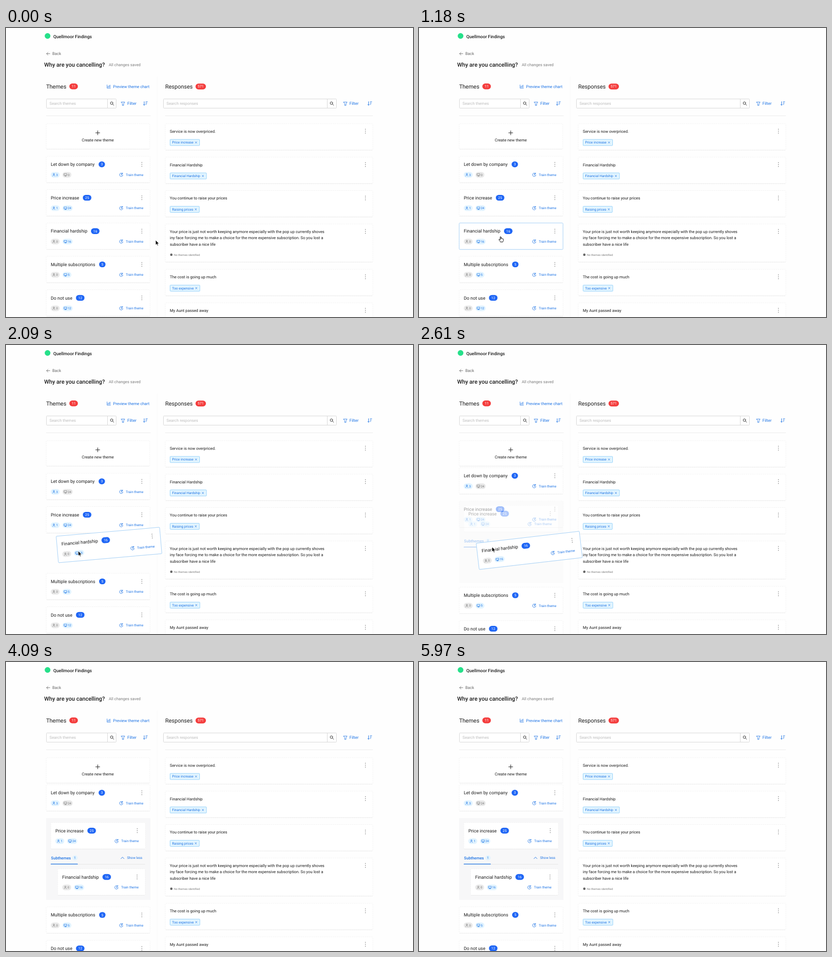
Animation of 800x568 px, one loop 6 s. Source, as an HTML page:

```html
<!DOCTYPE html>
<html lang="en">
<head>
<meta charset="utf-8">
<title>Theme drag and drop</title>
<style>
  html, body { margin: 0; width: 100%; height: 100%; overflow: hidden; background: #fefefe; }
  svg { display: block; width: 100vw; height: 100vh; font-family: Roboto, Arial, sans-serif; }
  text { white-space: pre; text-rendering: geometricPrecision; }
</style>
</head>
<body>
<svg viewBox="0 0 800 568">
  <g id="right"></g>
  <g id="left"><g id="head"></g><g id="list"></g></g>
  <g id="over"></g>
</svg>
<script>
const LOOP = 6000;
const BLUE = '#1b72e4', PILL = '#1f66f5', RED = '#f43d3d', INK = '#1c1c1c', GRAY = '#7d7d7d';
const EDGE = '#f2f2f2', LINE = '#e9e9e9';
const $ = id => document.getElementById(id);

// Drawing helpers
const text = (x, y, s, size = 7.8, fill = INK, weight = 400, anchor = 'start') =>
  `<text x="${x}" y="${y + size * .355}" font-size="${size}" fill="${fill}" font-weight="${weight}" text-anchor="${anchor}">${s}</text>`;
const rect = (x, y, w, h, fill, stroke = 'none', rx = 0, more = '') =>
  `<rect x="${x}" y="${y}" width="${w}" height="${h}" rx="${rx}" fill="${fill}" stroke="${stroke}" ${more}/>`;
const path = (d, stroke, width = .8, fill = 'none') =>
  `<path d="${d}" fill="${fill}" stroke="${stroke}" stroke-width="${width}" stroke-linejoin="round" stroke-linecap="round"/>`;
const group = (x, y, body, opacity = 1, turn = 0) =>
  `<g transform="translate(${x} ${y}) rotate(${turn})" opacity="${opacity}">${body}</g>`;
const pill = (x, y, w, h, s, fill, size, color = '#fff') =>
  rect(x, y - h / 2, w, h, fill, 'none', h / 2) + text(x + w / 2, y, s, size, color, 400, 'middle');
const dots = (x, y) => [-3.7, 0, 3.7].map(d => `<circle cx="${x}" cy="${y + d}" r=".75" fill="#666"/>`).join('');
const dashed = (x, y, w, h) =>
  rect(x, y, w, h, '#fff', EDGE, 1.5, 'stroke-width=".8" stroke-dasharray="3 1.2"') +
  path(`M${x + 1} ${y + h}h${w - 2}`, LINE, .7);

// Icons, centred on x, y
const icon = (x, y, d, color, width) => group(x, y, path(d, color, width));
const funnel = (x, y) => icon(x, y, 'M-3.4-3.2H3.4L1.2.2V3.4H-1.2V.2Z', BLUE);
const sorter = (x, y) => icon(x, y, 'M-2.4-3.6V3.6M-4 2L-2.4 3.6L-.8 2M.8-3.4H4M.8-.8H3M.8 1.8H2.2', BLUE, .9);
const lens = (x, y) => icon(x, y, 'M1.7-.8A2.5 2.5 0 1 1-3.3-.8A2.5 2.5 0 1 1 1.7-.8M1.1 1.1L3.4 3.4', '#222', .9);
const trainer = (x, y) => icon(x, y, 'M2.5-2.4A3.4 3.4 0 1 0 3.4.6M2.7-3.7V-2H1M0-1.6V.4H2', BLUE);
const person = (x, y, c) => icon(x, y, 'M1.3-1.3A1.3 1.3 0 1 1-1.3-1.3A1.3 1.3 0 1 1 1.3-1.3M-2.2 2.6C-2 0 2 0 2.2 2.6', c, .7);
const screen = (x, y, c) => icon(x, y, 'M-2.7-2.2H2.7V1.3H-2.7ZM0 1.3V2.6M-1.3 2.6H1.3', c, .7);

function counter(x, n, active, draw) {
  const color = active ? BLUE : '#777', w = n > 9 ? 20 : 17.5;
  return rect(x, 31, w, 11, active ? '#e1f3ff' : '#e9e9e9', 'none', 5.5) + draw(x + 6, 36.5, color) +
    text(x + 10.4, 36.5, n, 6, color);
}

function card(theme, w = 204, glow = 0) {
  const { name, badge, at, people, bots, idle } = theme;
  return dashed(0, 0, w, 52) +
    rect(0, 0, w, 52, '#fff', '#a9d3f8', 1.5, `opacity="${glow}"`) +
    text(9, 16, name, 8.9) +
    pill(at, 16, badge > 9 ? 16.8 : 12.6, 11.4, badge, PILL, 6.8) +
    dots(w - 16, 16) +
    counter(9, people, people > 0, person) + counter(32, bots, bots > 0 && !idle, screen) +
    trainer(w - 56.5, 36.5) + text(w - 47.5, 36.5, 'Train theme', 6.55, BLUE);
}

function search(x, w, split, label) {
  return rect(x, 139.5, w, 18, '#fff', '#d9d9d9', 1) + path(`M${split} 139.5v18`, '#d9d9d9', 1) +
    text(x + 6, 148.5, label, 7.8, '#bdbdbd') + lens(split + 9, 148.5);
}

function response(y, h, lines, tag, tagWidth) {
  const foot = y + 37 + 12.3 * (lines.length - 1);
  const note = tag
    ? rect(322.5, foot - 6, tagWidth, 12, '#e3f5ff', '#90d0fa', 1, 'stroke-width=".9"') +
      text(326.5, foot, tag, 6.7, BLUE) +
      icon(322.5 + tagWidth - 7, foot, 'M-1.6-1.6L1.6 1.6M1.6-1.6L-1.6 1.6', BLUE, .7)
    : `<circle cx="325" cy="${foot - 1}" r="2.4" fill="#666"/>` + text(330, foot - 1, 'No themes identified', 5.56, GRAY);
  return dashed(313, y, 408, h) + dots(706.5, y + 14.7) +
    lines.map((s, i) => text(322, y + 15.2 + 12.3 * i, s)).join('') + note;
}

// Fixed parts
$('right').innerHTML =
  '<circle cx="81.7" cy="15.6" r="5.6" fill="#26e08a"/>' +
  text(93, 16.8, 'Quellmoor Findings', 8.7, INK, 500) +
  icon(83, 50.5, 'M3.2 0H-3.2M-.4-2.8L-3.2 0L-.4 2.8', '#666') + text(91, 50.5, 'Back', 7.8, '#666') +
  text(75, 72.3, 'Why are you cancelling?', 11.1, INK, 500) +
  text(202, 72.3, 'All changes saved', 7.8, GRAY) +
  path('M297 96V568', '#f8f8f8', 1) +
  text(313, 115.3, 'Responses', 11) + pill(372.5, 115, 20.5, 11.4, 571, RED, 7) +
  search(309.5, 340, 631.5, 'Search responses') +
  funnel(667, 148.8) + text(675, 148.5, 'Filter', 8, BLUE) + sorter(715, 148.3) +
  path('M313 172.5H721', LINE) +
  response(188, 52, ['Service is now overpriced.'], 'Price increase', 58) +
  response(253.8, 52, ['Financial Hardship'], 'Financial Hardship', 71.5) +
  response(319.4, 52, ['You continue to raise your prices'], 'Raising prices', 57.5) +
  response(385.1, 75, [
    'Your price is just not worth keeping anymore especially with the pop up currently shoves',
    'iny face forcing me to make a choice for the more expensive subscription. So you lost a',
    'subscriber have a nice life']) +
  response(474.3, 52, ['The cost is going up much'], 'Too expensive', 58.5) +
  response(540, 52, ['My Aunt passed away'], 'Bereavement', 54);

$('head').innerHTML =
  text(79, 115, 'Themes', 11) + pill(124.5, 114.8, 16.8, 11.4, 11, RED, 7) +
  icon(202, 115, 'M-3.3-3.2V3.2H3.4M-1.5 1.4V-.4M.5 1.4V-2M2.5 1.4V-2.8', BLUE) +
  text(210.5, 115, 'Preview theme chart', 7.85, BLUE) +
  search(79.5, 137, 199.5, 'Search themes') +
  funnel(230, 148.8) + text(238.5, 148.5, 'Filter', 8, BLUE) + sorter(274, 148.3) +
  path('M79 172.5H284', LINE) +
  dashed(79, 188, 203.5, 50) + icon(180.3, 206, 'M-4 0H4M0-4V4', '#222', 1) +
  text(180.5, 220.3, 'Create new theme', 7.8, INK, 400, 'middle');

// Moving parts
const theme = (name, badge, at, people, bots, idle) => ({ name, badge, at, people, bots, idle });
const letDown = theme('Let down by company', 3, 103, 3, 0, true);
const price = theme('Price increase', 25, 72, 1, 24);
const hardship = theme('Financial hardship', 16, 88, 0, 16);
const multiple = theme('Multiple subscriptions', 5, 104, 0, 5);
const unused = theme('Do not use', 12, 58.5, 0, 12);

const clamp = u => Math.min(1, Math.max(0, u));
const ease = (t, from, to) => 1 - (1 - clamp((t - from) / (to - from))) ** 3;
const glideEase = (t, from, to) => { const u = clamp((t - from) / (to - from)); return u * u * (3 - 2 * u); };
const mix = (a, b, u) => a + (b - a) * u;
const follow = (start, ...legs) => legs.reduce((v, [to, u]) => mix(v, to, u), start);

function folder(count) {
  return rect(79, 307, 205, 160.5, '#f7f7f8') +
    group(88, 315.5, card(price, 186)) +
    text(88.5, 385, 'Subthemes', 7.7, BLUE, 500) +
    pill(130.5, 385, 10, 10, count, '#e1f3ff', 6.4, BLUE) +
    icon(229, 385, 'M-3 1.6L0-1.6L3 1.6', BLUE, .9) + text(238, 385, 'Show less', 6.65, BLUE) +
    path('M88 397.5H273', '#e4e4e4') + path('M88.5 397.2H140.5', BLUE, 1.3);
}

const arrow = path('M0 0V9.4L2.2 7.5L3.7 11L5.3 10.3L3.8 6.9H6.7Z', '#fff', .8, '#000');
const hand = path('M-1.1.9C-1.1-.4.7-.4.7.9V4C1-.1 2.4 3.2 2.5 4.2C3 3.3 4 3.6 4.1 4.6C4.7 4 5.5 4.5 5.4 5.5' +
  'C5.4 8 4.9 8.6 4.3 10.6H-.6C-1 9-2.6 7.6-3.4 6.2C-3.8 5.2-2.6 4.7-1.9 5.6L-1.1 6.4Z', '#000', .9, '#fff');

function draw(t) {
  const reach = glideEase(t, 20, 500), hover = ease(t, 470, 600);
  const glide = glideEase(t, 1600, 1760), lift = ease(t, 1678, 2078);
  const shift = ease(t, 2200, 2450), open = ease(t, 2551, 3000), drop = ease(t, 3740, 4140);
  const up = -11 * shift, rest = 448.6 + up + 109.4 * open - 66 * drop;

  $('left').setAttribute('opacity', 1 - lift * (1 - lift));
  $('list').innerHTML =
    group(79, 252 + up, card({ ...letDown, bots: lift > .5 ? 24 : 0 })) +
    group(79, 317.6 + up, card(price), 1 - open) +
    group(79, 383.2, card(hardship, 204, hover), 1 - lift) +
    group(0, 0, folder(drop > .5 ? 1 : 0), open) +
    group(79, rest, card(multiple)) +
    group(79, rest + 65.8, card(unused));

  const x = follow(98.6, [138, open], [101.5, drop]);
  const y = follow(376, [415, open], [406.5, drop]);
  const turn = follow(-5, [-9.6, open], [0, drop]);
  const pointer = t >= 500 && t < 1678 ? hand : arrow;
  $('over').innerHTML =
    group(x, y, card(hardship, mix(204, 172, drop), 1 - drop), lift, turn) +
    group(follow(294, [160.5, reach], [142, glide], [143.5, shift]),
      follow(417, [410, reach], [405, glide], [397, shift]), pointer, 1 - drop);
}

function tick() {
  draw(performance.now() % LOOP);
  requestAnimationFrame(tick);
}
tick();
</script>
</body>
</html>
```
